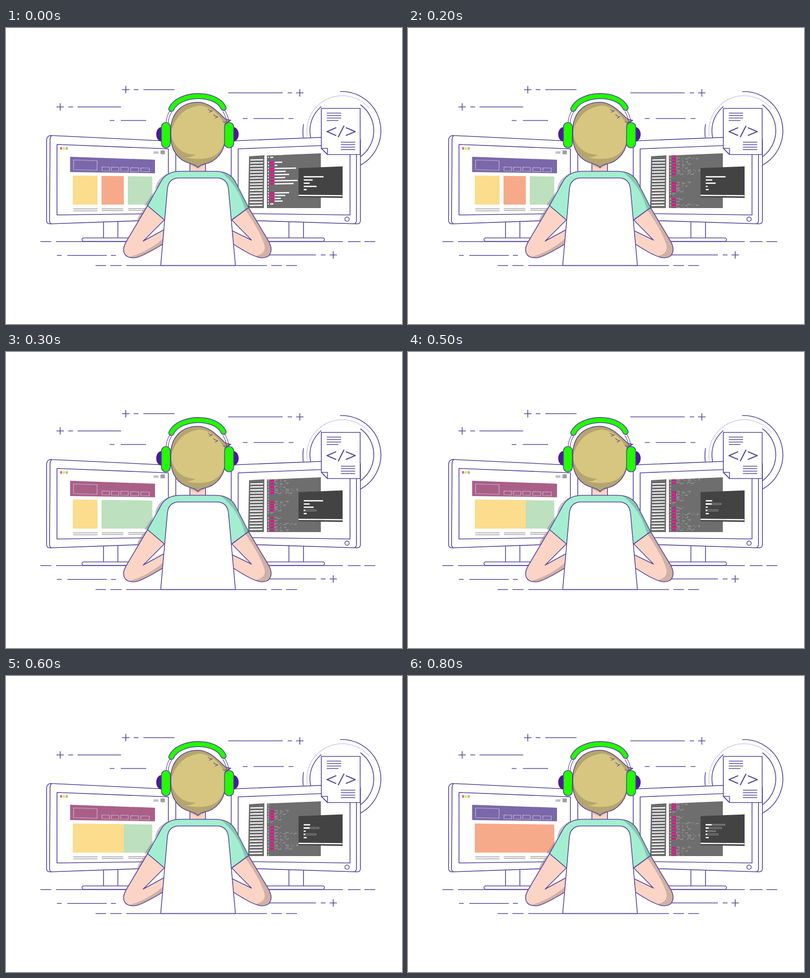
An HTML page that plays this animation: 800 px wide and 600 px high, repeating every 900 ms.

```html
<!DOCTYPE html>
<html lang="en">
<head>
<meta charset="utf-8">
<title>Developer at work</title>
<style>
  html, body { margin: 0; width: 100%; height: 100%; overflow: hidden; background: #fff; }
  svg { display: block; width: 100%; height: 100%; }
  .ink { fill: none; stroke: #56479b; stroke-width: 1.6; stroke-linejoin: round; }
  .thin { stroke-width: 1.2; }
  .white { fill: #fff; }
  .skin { fill: #fcd4c6; }
  .skinShade { fill: #d0b1a5; }
  .green { fill: #22fb00; }
  .pad { fill: #4b1b96; }
  .hollow { fill: none; stroke: #d2d2d2; stroke-width: .6; }
  .worn { stroke-dasharray: 7 5 2 8; }
  .band { stroke-width: 12; stroke-linecap: round; }
  .bandFill { stroke: #22fb00; stroke-width: 8.8; }
</style>
</head>
<body>
<svg viewBox="0 0 800 600">
  <defs>
    <clipPath id="editorClip"><path d="M527 258.5L636 254V365H527Z"/></clipPath>
    <path id="leftArm" d="M286 360L243 433C232 452 238 468 262 465.500C276 463 300 448 317 438L319 409L277 432L320 389Z"/>
    <path id="rightArm" d="M490 364L531 433C540 450 536 468 514 465.500C498 463 475 448 459 438L457 411L496 430L456 389Z"/>
    <path id="shirt" d="M286 360L312 313Q323 291 351 290.500H424Q452 291 463 311L490 364L456 389H320Z"/>
    <path id="head" d="M333 202C336 167 360 150.500 388 150.500C410 150.500 427 169 444 185L454 187L443 194V222C443 250 424 272 400 276Q391 278 388 283Q384 278 373 275C346 268 332 246 333 216Z"/>
    <path id="band" d="M334 164C349 130.500 425 129 439.500 162"/>
  </defs>

  <!-- Floating lines -->
  <path class="ink" d="M234.500 125h15M242 117.500v15M258 125h9.500M277.500 125h63
    M102 160h15M109.500 152.500v15M126 160h9.500M144.500 160h88
    M209.500 187.500h9.500M232 187.500h51
    M449 131.500h110M569 131.500h9M586 131.500h15M593.500 124v15
    M478.500 183.500h9.500M500.500 183.500h60.500M571 183.500h9.500
    M69.500 433h22M101 433h145M530 433h150.500M690.500 433h26M724 433h22
    M103 461h9.500M124 461h79.500M212 461h10M532 460h94M636 460h9.500M653.500 460h15M661 452.500v15"/>

  <!-- Rings -->
  <path class="ink" d="M675 128.800A79.500 79.500 0 0 1 716 278M601 195Q599 208 600.500 222
    M637 159Q614 180 614 208Q614 216 615.500 222M716 155.500A65 65 0 0 1 716 261"/>
  <path class="ink thin" stroke-dasharray="1 2" d="M608.500 219A71.500 71.500 0 0 1 735 164"/>

  <!-- Stands -->
  <path class="ink white" d="M197 393V426H226V393M571.500 393V426H601V393"/>
  <rect class="ink white" x="153.500" y="425.500" width="110" height="7" rx="3.500"/>
  <rect class="ink white" x="515" y="425.500" width="128.500" height="7" rx="3.500"/>

  <!-- Left monitor -->
  <path class="ink white" d="M93 218L343 230V388L89 397Q82 397 82 390V229Q82 217 93 218Z"/>
  <path class="ink" d="M93 218Q89 219 89 228L88 390Q88 396 92 397"/>
  <path class="ink white" d="M103 236L328 245V376L103 379Z"/>
  <ellipse cx="111.300" cy="244" rx="2.300" ry="3" fill="#e56e86"/>
  <ellipse cx="117" cy="244.200" rx="2.300" ry="3" fill="#f8d95e"/>
  <ellipse cx="122.700" cy="244.300" rx="2.300" ry="3" fill="#a2c57c"/>
  <rect x="298" y="250" width="10" height="5" fill="#c5bfda"/>
  <rect x="312" y="248" width="9" height="8" rx="1.500" fill="#a19fa5"/>
  <path id="banner" d="M129.500 261L301 267V294.500L129.500 292Z"/>
  <path fill="none" stroke="#c3b5d4" stroke-width="1.200" d="M136.500 267.500L184 269V288.500L136.500 287Z
    M194 281.500l15 .5v8l-15 -.5zM213 282l15 .5v8l-15 -.5zM232 282l15 .5v8l-15 -.5z
    M252 283l16 .5v8l-16 -.5zM272.500 283.500l17 .5v7.500l-17 -.5z"/>
  <g id="cards"></g>
  <path fill="none" stroke="#a3a1a5" stroke-width="1.400" d="M136 366.500H185M193.500 366.500H237M247 366H281
    M136 370.500H185M193.500 370H237M247 369.500H278"/>

  <!-- Right monitor -->
  <path class="ink white" d="M455 229L705 219Q716 218 716 229V390Q716 397 709 397L455 389Z"/>
  <path class="ink" d="M708 222V390Q708 395 704 396.500"/>
  <path class="ink white" d="M469 245L695 236V379L469 376Z"/>
  <circle class="ink" cx="689" cy="387.500" r="4.300"/>
  <path fill="#6c6c6d" d="M491 260L522 258L521 365H489Z"/>
  <g id="sidebar" fill="#fff"></g>
  <path fill="#6e6e6f" d="M527 258.500L636 254V365H527Z"/>
  <g clip-path="url(#editorClip)"><g id="code"></g></g>
  <path fill="#434343" d="M591 284L680 280.500V344.500L591 343Z"/>
  <path fill="none" stroke="#fff" stroke-width="2.400" d="M591 339.200L679.500 340"/>
  <g id="terminal"></g>

  <!-- Document -->
  <path class="ink white" d="M637 163H715.500V256.500H649.500L637 244Z"/>
  <path class="ink" d="M637 244H649.500V256.500Z"/>
  <path class="ink" d="M648 172.500H677M648 177.500H677M648 182.500H677M648 187.500H671.500
    M676.500 231.500H705.500M676.500 236.500H705.500M676.500 241.500H705.500M676.500 246.500H705.500"/>
  <path class="ink" style="stroke-width:2.200" d="M667 202L648.500 210L667 218M683 198L671 221.500M686.500 202L705.500 210L686.500 218"/>

  <!-- Body -->
  <path fill="#8d8297" opacity=".5" d="M340 291.500Q306 297 301 328L318 309ZM299 331L280 359L288 362ZM284 362Q268 375 264 392L274 388Z"/>
  <path class="ink skin" d="M371.500 268V292H403V268Z"/>
  <path class="skinShade" d="M372.500 272H402V277L388 285L372.500 278Z"/>
  <use href="#leftArm" class="skin"/>
  <path class="skinShade" d="M247 464.500Q285 455 318.500 426L317 438C300 448 276 463 262 465.500Q254 467 247 464.500Z"/>
  <use href="#leftArm" class="ink"/>
  <use href="#rightArm" class="skin"/>
  <path class="skinShade" d="M490 364L531 433C540 450 536 468 514 465.500L505 462Q526 457 522 440Q514 413 483 368Z"/>
  <use href="#rightArm" class="ink"/>
  <use href="#shirt" fill="#a3eed1"/>
  <path fill="#86c5ad" d="M433 291Q454 294 463 311L490 364L483 369Q470 319 433 291Z"/>
  <use href="#shirt" class="ink"/>
  <path class="ink white" d="M312.500 481.500L326 327Q328 304 350 304H426Q447 304 449.500 327L463.500 481.500Z"/>
  <path class="ink" d="M181 481.500h21M211 481.500h22.500M243 481.500h284M536 481.500h21.500M566 481.500h22"/>

  <!-- Head -->
  <use href="#head" fill="#b5a56e"/>
  <path fill="#d6c680" d="M334 208Q348 162 392 157Q424 161 442 196V222C441 246 425 262 402 264.500Q381 267 363 262.500Q375 262 383 257Q345 256 334 219Z"/>
  <use href="#head" class="ink"/>
  <path class="ink thin" d="M408 164Q411 168 417 168L410 171M419 175Q422 179 428 180L422 183M438 190Q446 193 454 187"/>

  <!-- Headphones -->
  <ellipse class="pad" cx="314" cy="215.500" rx="10.500" ry="14.500"/>
  <ellipse class="pad" cx="459.500" cy="215.500" rx="10.500" ry="14.500"/>
  <path class="ink thin" d="M331 168Q324 179 323.500 192M335 170Q328 180 328 192M442 167Q449 178 450.500 192M438 169Q445 180 446 192"/>
  <use href="#band" class="ink band"/>
  <use href="#band" class="ink band bandFill"/>
  <rect class="ink green" x="314" y="191.500" width="18" height="51.500" rx="9"/>
  <rect class="ink green" x="441.500" y="191.500" width="18.500" height="51.500" rx="9"/>
</svg>
<script>
const STEP = 100, STEPS = 9, SCROLL = 10.05, CODE_PERIOD = 94.5;
const $ = id => document.getElementById(id);
const rect = (x, y, w, h, attrs) => `<rect x="${x}" y="${y}" width="${w}" height="${h}" ${attrs}/>`;
const FILLED = 'fill="#fff"', HOLLOW = 'class="hollow"', WORN = 'class="hollow worn"';
const YELLOW = '#fcdc8d', ORANGE = '#f7aa8a', GREEN = '#bde0be';

// Right end of every code line; 0 is an empty line.
const lineEnds = [558, 548, 586, 565, 572, 564, 589, 581, 0, 0, 572, 564, 555, 559, 540];
const lineTop = i => i < 10 ? i * 6.25 : 62 + (i - 10) * 5.6;

const layouts = [
  { until: 3, banner: '#7a68aa', cards: [[135, 185, YELLOW], [193, 238, ORANGE], [246, 295.5, GREEN]] },
  { until: 5, banner: '#aa5f87', cards: [[135, 185, YELLOW], [193, 295.5, GREEN]] },
  { until: 7, banner: '#aa5f87', cards: [[135, 238, YELLOW], [238, 295.5, GREEN]] },
  { until: 9, banner: '#7a68aa', cards: [[135, 295.5, ORANGE]] }
];

// Terminal lines as [solid width, full width].
const prompts = [
  { until: 1, lines: [[40, 40], [18, 18], [12, 12], [26, 26], [6, 6]] },
  { until: 3, lines: [[40, 40], [13, 13], [20, 20], [4, 4], [6, 6]] },
  { until: 5, lines: [[39, 39], [12, 12], [20, 20], [3, 25], [6, 6]] },
  { until: 8, lines: [[13, 13], [12, 31], [4, 4], [3, 25], [6, 6]] },
  { until: 9, lines: [[12, 39], [6, 32], [3, 20], [3, 25], [6, 6]] }
];
const pick = (list, step) => list.find(item => step < item.until);

function codeMarkup(step) {
  const mark = step ? HOLLOW : FILLED, bar = step ? WORN : FILLED;
  let out = '';
  for (let copy = -1; copy < 3; copy++) {
    lineEnds.forEach((end, i) => {
      const y = 271 + copy * CODE_PERIOD + lineTop(i) - step * SCROLL;
      if (y < 252 || y > 366) return;
      out += rect(529, y, 2, 2.4, mark);
      if (!end) return;
      const short = i === lineEnds.length - 1;
      if (!short) out += rect(533, y - .5, 9, 3.6, 'fill="#e0128d"');
      const x = short ? 534 : 542.5;
      out += rect(x, y, end - x, 2.5, `${bar} transform="rotate(-1 ${x} ${y})"`);
    });
  }
  return out;
}

const terminalMarkup = step => pick(prompts, step).lines.map(([solid, full], i) => {
  const y = 300.3 + i * 6.5;
  return (full > solid ? rect(601.5, y, full, 2.4, HOLLOW) : '') + rect(601.5, y, solid, 2.6, FILLED);
}).join('');

const cardMarkup = ([left, right, color]) => {
  const top = x => 299 + (x - 135) * .012;
  return `<path fill="${color}" d="M${left} ${top(left)}L${right} ${top(right)}V358H${left}Z"/>`;
};

$('sidebar').innerHTML = Array.from({ length: 16 }, (_, i) => {
  const y = 266 + i * 6.15;
  return rect(493.5 - i * .1, y, 26, 2.4, `transform="rotate(-1 507 ${y})"`);
}).join('');

const frames = Array.from({ length: STEPS }, (_, step) => {
  const { banner, cards } = pick(layouts, step);
  return { banner, cards: cards.map(cardMarkup).join(''), code: codeMarkup(step), terminal: terminalMarkup(step) };
});

let shown = -1;
function render(now) {
  const step = Math.floor(now / STEP) % STEPS;
  if (step === shown) return;
  const frame = frames[shown = step];
  $('banner').setAttribute('fill', frame.banner);
  for (const part of ['cards', 'code', 'terminal']) $(part).innerHTML = frame[part];
}
const start = performance.now();
function tick() {
  render(performance.now() - start);
  requestAnimationFrame(tick);
}
tick();
</script>
</body>
</html>
```
